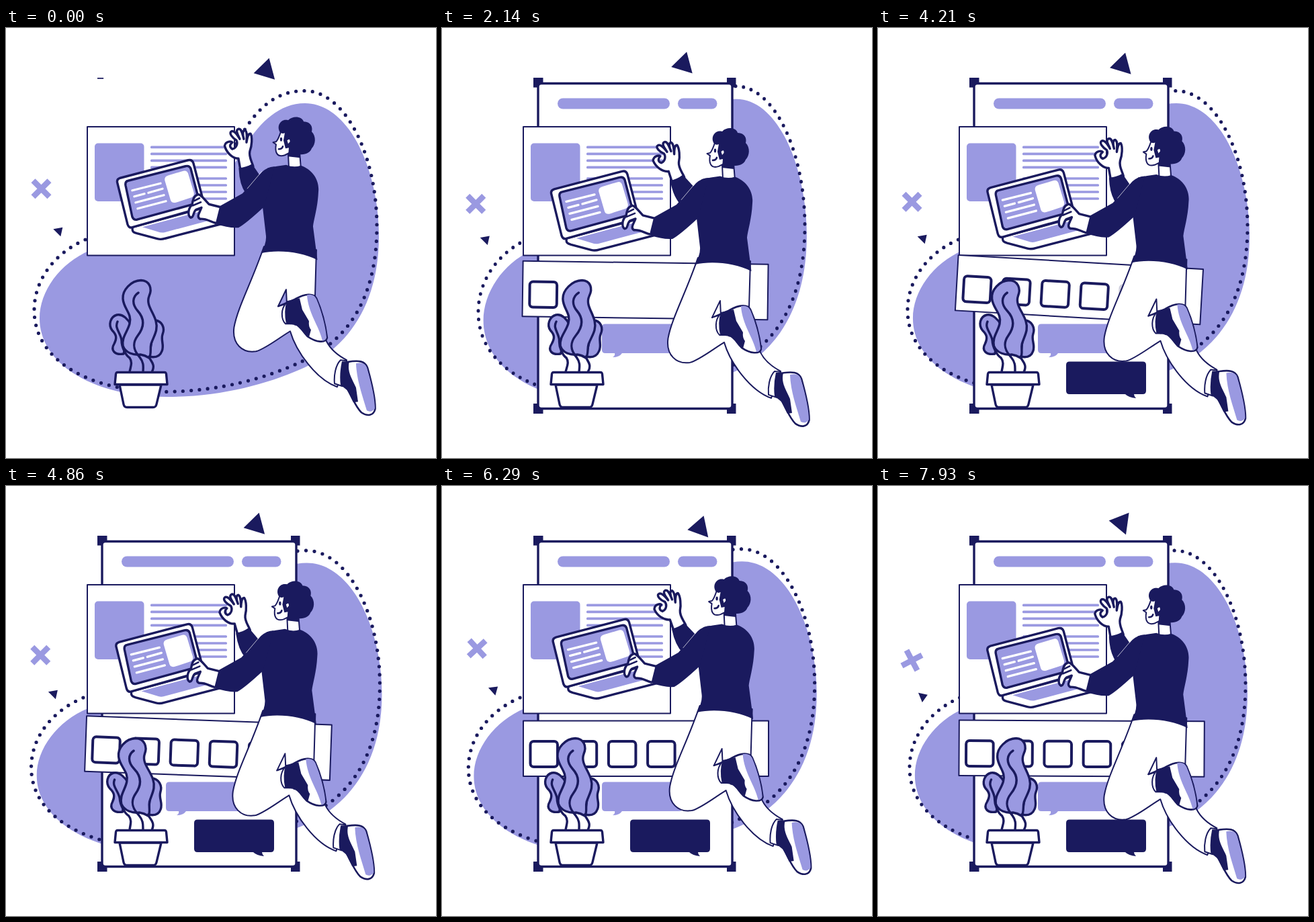
Write an HTML page that moves like this. It is 640 by 640 pixels and loops after 8 s.

```html
<!DOCTYPE html>
<html lang="en">
<head>
<meta charset="utf-8">
<title>Building a page</title>
<style>
  html, body { margin: 0; width: 100%; height: 100%; overflow: hidden; background: #fff; }
  svg { display: block; width: 100%; height: 100%; }
  .navy { fill: #1a1a5e; }
  .lilac { fill: #9a99e1; }
  .white { fill: #fff; }
  .line { stroke: #1a1a5e; stroke-linecap: round; stroke-linejoin: round; stroke-width: 3.4; }
  .thin { stroke-width: 2; }
  .medium { stroke-width: 2.6; }
  .tile { stroke-width: 4; }
  .dots { stroke-width: 5.2; stroke-dasharray: 0 12.3; }
  .open { fill: none; }
</style>
</head>
<body>
<svg viewBox="0 0 640 640">
  <clipPath id="wipe"><rect id="wipeRect" x="130" y="70"/></clipPath>

  <g id="backdrop">
    <path class="lilac" d="M445 112C510 112 555 210 555 310C555 400 518 470 445 505C390 530 320 549 240 549C130 549 50 500 50 432C50 392 80 350 125 331C200 305 270 310 310 255C335 225 368 112 445 112Z"/>
    <path class="line open dots" d="M444 93.5C505 93 552 190 552 295C552 390 518 460 441 496C390 520 320 541 234 541.5C125 541 42 495 42 420C42 375 72 335 118 315C200 285 270 290 310 235C342 180 368 93 444 93.5"/>
  </g>

  <path id="bigTriangle" class="navy" d="M392 45L369 67.5L400.5 77Z"/>
  <path id="smallTriangle" class="navy" d="M70.5 299L84.5 296.5L81.5 310Z"/>
  <path id="cross" d="M40.500 227L64.500 251M64.500 227L40.500 251" stroke="#9a99e1" stroke-width="8.5"/>

  <g clip-path="url(#wipe)">
    <path class="navy" d="M136 74h14.500v14.500h-14.500zM424 74h13.500v14.500h-13.500zM136 559h14.500v15h-14.500zM424 559h13.500v15h-13.500z"/>
    <rect class="white line" x="143" y="82.5" width="289" height="484" rx="5"/>
    <rect class="lilac" x="172" y="104.5" width="167" height="16" rx="8"/>
    <rect class="lilac" x="351" y="104.5" width="58.5" height="16" rx="8"/>
  </g>
  <path id="bubbleA" class="lilac" d="M243 440.500H353q5 0 5 5V479q0 5-5 5H268Q264 490 254 490Q258 488 257 484H243q-5 0-5-5V445.500q0-5 5-5Z"/>
  <path id="bubbleB" class="navy" d="M285 496.500H394q5 0 5 5V540q0 5-5 5H381Q381 548 384 551Q373 550 368 545H285q-5 0-5-5V501.500q0-5 5-5Z"/>

  <rect class="white line thin" x="121" y="147" width="219" height="191.5"/>
  <rect class="lilac" x="132" y="171.5" width="73.5" height="86.5" rx="5"/>
  <g id="textLines"></g>

  <g id="strip">
    <rect class="white line thin" x="121" y="349.5" width="365" height="82.5"/>
  </g>

  <g id="plant">
    <path class="lilac line" d="M222 435C232 436 237 446 233 456C230 465 236 472 232 481C229 489 222 491 213 489Z"/>
    <path class="lilac line" d="M186 442C182 434 174 425 165 427C155 430 152 442 158 450C165 457 165 462 161 470C155 480 162 487 175 485Z"/>
    <path class="lilac line" d="M201 375.500C186 376 173 390 174 403C175 418 188 425 184 440C181 452 172 460 174 473C178 484 190 487 200 486Q207 487 213 491C217 485 214 478 216 470C220 458 227 450 223 436C219 422 208 412 213 399C218 388 214 376 201 375.500Z"/>
    <path class="line open" d="M197 394C188 400 187 411 196 421C207 433 206 445 196 458C187 470 190 480 199 490C206 499 204 505 204 512M166 437C161 447 171 454 172 465C172 475 178 487 184 491C189 498 185 505 184 512M213 489C213 494 224 500 217 512"/>
  </g>
  <path class="white line" d="M169 531L175 560Q176 564.500 180 564.500H219Q223 564.500 224 560L231 531Z"/>
  <path class="white line" d="M166 512.500H236Q238 512.500 238.500 515L240 530.500H162L163.500 515Q164 512.500 166 512.500Z"/>

  <g id="person">
    <g id="wavingArm">
      <path class="white line" d="M349 211L346 194C337 194 328 185 325.500 175C327 168 335 168 337 170C333 173 332 177 337 180C344 178 345 171 343 167C337 163 332 157 335 154C339 151 344 158 348 165C345 158 341 152 346 150C351 149 352 158 354 165C352 158 352 152 356 152C360 155 358 163 358 170C359 163 360 157 364 157C367 162 366 175 363 183C361 192 366 198 368 206"/>
      <path class="navy line thin" d="M347.500 209Q358 208 366 203.500L380 224L358 246C350 235 348 222 347.500 209Z"/>
    </g>

    <path class="white line" d="M188.500 296C187 303 190 304 195 305.500L225 313.500Q231 315 237 313L322 291L300 266Z"/>
    <path class="lilac" d="M203 296L300 270L322 281L236 304Q231 305 226 303Z"/>
    <path class="white line" d="M170 223L271 196.500Q277 195 279 201L296 266L188 296.500Q183 298 181 292L166 231Q164 225 170 223Z"/>
    <path class="lilac line" d="M182 227L267 205.500Q273 204 275 209L287 255Q288 260 283 261L195 285Q190 286 188 281L178 234Q177 228 182 227Z"/>
    <path class="white" d="M242 219L264 212.500Q269 211 271 216L279.500 244Q281 250 276 252L253 259.500Q247 261 245 256L236.500 227Q235 221 242 219Z"/>
    <path d="M188 241.500L230 231M191 250.500L206 246.500M212 245L233 239M193 259.500L235 248.500M196 268.500L238 257.500" stroke="#fff" stroke-width="3.3" stroke-linecap="round"/>

    <path class="white line thin" fill-rule="evenodd" d="M384 325C365 380 345 415 339.500 445C336 470 352 484 372 481C385 478 405 462 423 451C432 482 462 523 493 534L507 494C492 486 483 478 477 466L460 400L462 330ZM417 389L405 414L418 410Z"/>
    <path class="line thin open" d="M405 414L440 399"/>
    <path class="white line thin" d="M417 409C409 418 409 433 416 440L424 440V408Z"/>
    <path class="white line medium" d="M431 403C445 395 458 394 462 402C471 422 476 445 478 461C476 469 462 468 449 459C440 450 438 442 430 441Z"/>
    <path class="lilac" d="M448 397Q458 395 462 403C470 422 476 445 477 460Q475 466 471 465C466 443 450 425 448 397Z"/>
    <path class="navy" d="M418 406L437 402L441 419L451 436Q450 444 454 449L451 460L432 442L417 440Q413 421 418 406Z"/>

    <path class="white line thin" d="M498 494C490 502 488 518 489 529L501 533L507 495Z"/>
    <path class="white line medium" d="M507 497C525 494 534 495 538 505C545 530 550 553 549.500 567C547 577 538 578 529 572C519 562 516 549 508 537Z"/>
    <path class="lilac" d="M521 499Q534 496 537 505C545 532 549 553 549 566Q544 573 537 569C531 548 522 525 521 499Z"/>
    <path class="navy" d="M500 496L511 496C507 512 516 523 521 535L524 556L517 557L508 539L498 531Q496 514 500 496Z"/>

    <path class="white line thin" d="M420 186L421 207L439 209L437 184Z"/>
    <path class="white line thin" d="M410 152C407 159 406 165 402 169L397.500 170L402 173C400 184 403 193 415 189L427 183L424 155Z"/>
    <path class="navy" d="M408 155C402 146 409 134 420 137C428 129 441 132 443 139C454 139 457 148 455 154C462 161 461 173 455 179C452 187 444 188 437 188L438 193L420 191L421 178L416 179L413 167L415 156Q411 158 408 155Z"/>
    <path class="white" d="M418.500 167Q423 163 422.500 169L420 172Z"/>
    <ellipse class="navy" cx="409.500" cy="165.500" rx="1.7" ry="3"/>
    <path class="line medium open" d="M406 180Q411 180 412 176"/>

    <path class="navy" d="M417 203.500Q428 208 439 204.500C455 210 467 225 465 244C464 267 458 285 457 295L463.500 345C440 333 405 329 379.500 335Q388 320 387 309L382 266L376 222L390 208Q403 205 417 203.500Z"/>
    <path class="navy" d="M400 206Q390 206 381 214L352 246L318 265Q312 277 312 291Q331 298 346 297Q357 291 384 266Z"/>
    <path class="open" d="M381 213L359 239" stroke="#fff" stroke-width=".7"/>
    <path class="white line" d="M318 266L302 262C295 254 287 245 285 248C279 250 278 257 277 263C271 268 270 279 275 282C280 282 278 274 283 270L291 267C288 275 283 281 289 284C298 283 304 288 312 290"/>
    <path class="line medium open" d="M280 257L288 253M278 264L290 259"/>
  </g>
</svg>
<script>
const NS = 'http://www.w3.org/2000/svg';
const LOOP = 8000;
const $ = id => document.getElementById(id);
const clamp = v => Math.max(0, Math.min(1, v));
const progress = (t, start, length) => clamp((t - start) / length);

function addRect(parent, attributes) {
  const rect = document.createElementNS(NS, 'rect');
  for (const name in attributes) rect.setAttribute(name, attributes[name]);
  return parent.appendChild(rect);
}

for (let i = 0; i < 8; i++) {
  addRect($('textLines'), {
    class: 'lilac', x: 215, width: 114, height: 3.6, rx: 1.5,
    y: 175.6 + i * 10 + (i > 3 ? 6.6 : 0)
  });
}

const tiles = [0, 1, 2, 3, 4].map(i => addRect($('strip'), {
  class: 'white line tile', x: 131.5 + i * 58.2, y: 380, width: 40.5, height: 38, rx: 5
}));

// Interpolates [time, value] pairs with a smooth step between neighbours.
function track(keys, t) {
  const next = keys.findIndex(key => key[0] > t);
  if (next < 0) return keys[keys.length - 1][1];
  if (next === 0) return keys[0][1];
  const [t0, v0] = keys[next - 1], [t1, v1] = keys[next];
  const p = (t - t0) / (t1 - t0);
  return v0 + (v1 - v0) * p * p * (3 - 2 * p);
}

const blobWidth = [[0, 255], [500, 262.5], [860, 261], [1290, 251], [2100, 243], [3070, 248],
  [4210, 253], [5000, 260], [5570, 259], [6050, 260.5], [7070, 240.5], [7930, 250]];
const blobHeight = [[0, 1], [600, .98], [1290, 1.006], [2200, 1.03], [3070, 1.024],
  [4210, 1], [5570, .976], [7070, 1.024], [7930, .989]];
const plantSway = [[0, 0], [1290, 6.5], [2000, 7.5], [3070, 4], [4210, -5.5], [4900, -8],
  [5570, -6.5], [7070, 2], [7930, 4.5]];
const stripTilt = [[1500, 0], [3070, 2.1], [3900, 3.6], [4210, 3.3], [5570, .65],
  [6100, 0], [7200, 0], [7930, .3]];

function place(id, transform) {
  $(id).setAttribute('transform', transform);
}

function drift(id, k, dx, dy, angle, cx, cy) {
  place(id, `translate(${dx * k} ${dy * k}) rotate(${angle} ${cx} ${cy})`);
}

function pop(id, p, x, y) {
  const s = 1 - (1 - p) ** 3;
  place(id, `translate(${x} ${y}) scale(${s}) translate(${-x} ${-y})`);
}

function draw(t) {
  // Linear back and forth: 0 to 1 in three seconds, then back.
  const phase = (t + 5970) % 6000 / 3000;
  const bob = 1 - Math.abs(1 - phase);
  const spin = Math.max(0, t - 6030) / 1000;

  drift('bigTriangle', bob, -39.5, -13.5, spin * 12, 387, 63);
  drift('smallTriangle', bob, -19.5, 18.5, spin * 12, 79, 302);
  drift('cross', bob, -3.2, 32.5, spin * 9, 52.5, 239);
  drift('person', bob, -4.3, 24, 0, 0, 0);

  const wave = Math.sin(Math.PI * Math.min(1, t % 4300 / 4300 / .7));
  place('wavingArm', `rotate(${-10.5 * wave} 360 235)`);

  const sx = track(blobWidth, t) / 255, sy = track(blobHeight, t);
  place('backdrop', `translate(297 325) scale(${sx} ${sy}) translate(-297 -325)`);

  const skew = -track(plantSway, t) / 136;
  place('plant', `matrix(1 0 ${skew} 1 ${-512 * skew} 0)`);

  $('wipeRect').setAttribute('width', 15 + t * .156);
  $('wipeRect').setAttribute('height', 5.5 + t * .2686);
  pop('bubbleA', progress(t, 1800, 350), 254, 490);
  pop('bubbleB', progress(t, 2150, 350), 384, 551);

  $('strip').style.opacity = progress(t, 1400, 300);
  place('strip', `rotate(${track(stripTilt, t)} 320 320)`);
  tiles.forEach((tile, i) => tile.style.opacity = progress(t, 1740 + i * 600, 350));
}

const begin = performance.now();
function frame() {
  draw((performance.now() - begin) % LOOP);
  requestAnimationFrame(frame);
}
frame();
</script>
</body>
</html>
```
